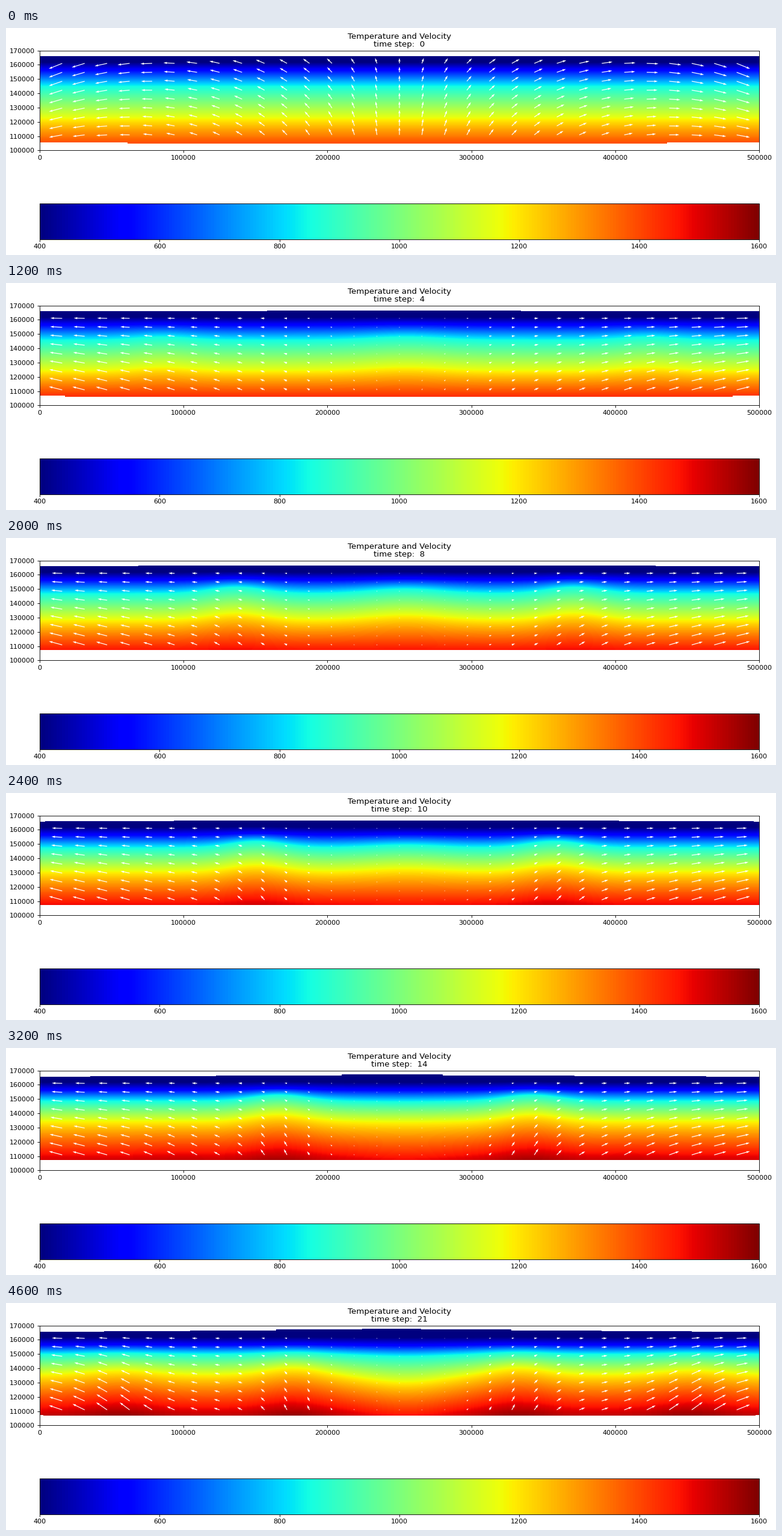
Write a matplotlib script that moves like this. It is 1280 px wide and 379 px high and loops after 4800 ms.

```python
import numpy as np
import matplotlib.pyplot as plt
from matplotlib.animation import FuncAnimation

W, H, DPI = 1280, 379, 80
LEFT, TOP, AX_W, AX_H = 56, 37.55, 1196, 166.9
FRAMES, INTERVAL, HOLD = 24, 200, 2

ROW = 1.44                      # height of one sampled row of the field
REST_TOP, REST_FLOOR = 47.6, 191.8
PEAK_X, PLUME_X = 640, 664


def ramp(step, start, end):
    return np.clip((step - start) / (end - start), 0, 1)


def smooth(t):
    return t * t * (3 - 2 * t)


def bell(x, mid, width):
    return np.exp(-((x - mid) / width) ** 2)


px = LEFT + np.arange(AX_W) + 0.5
py = (TOP + (np.arange(167) + 0.5) * AX_H / 167)[:, None]

# 0 at the sides of the layer, 1 under its highest point
toward_peak = np.where(px < PEAK_X, (px - LEFT) / (PEAK_X - LEFT),
                       (LEFT + AX_W - px) / (LEFT + AX_W - PEAK_X))


def plume_shapes(step, x):
    """Bells of the central, paired inner and paired outer plumes."""
    inner = 180 + 150 * np.exp(-(step - 6) / 5)
    outer = 430 + 15 * (step - 18)
    centre = bell(x, PLUME_X, 85)
    pair = bell(x, PLUME_X - inner, 65) + bell(x, PLUME_X + inner, 65)
    far = bell(x, PLUME_X - outer, 75) + bell(x, PLUME_X + outer, 75)
    return centre, pair, far


def lift(step, x):
    centre, pair, far = plume_shapes(step, x)
    growth = ramp(step, 2, 6)
    sinking = 11 - 1.53 * max(step - 6, 0)
    return growth * (sinking * centre + 11 * pair) + 7 * ramp(step, 14, 21) * far


def heating(step, x):
    _, pair, far = plume_shapes(step, x)
    return 50 * ramp(step, 6, 12) * pair + 50 * ramp(step, 12, 18) * far


def cooling(step, x):
    return 5 * max(step - 8, 0) * plume_shapes(step, x)[0]


def edges(step):
    """Top and bottom of the layer, snapped to sampled rows."""
    side, peak = 0.3 - 0.05 * step, 0.5 + 0.135 * step
    bend = np.clip((step - 5) / 9, 0.1, 1)
    surface = side + (peak - side) * toward_peak ** bend

    floor = (0.8 - 0.033 * min(step, 6) + 0.8 * toward_peak
             - 3.45 * ramp(step, 2, 6) + 0.12 * max(step - 14, 0))
    return REST_TOP - ROW * np.floor(surface), REST_FLOOR + ROW * np.floor(floor)


def temperature(step):
    warm = lift(step, px)
    cool = warm * (1 - 0.7 * smooth(ramp(step, 13, 18)))
    base = 1385 + 145 * ramp(step, 0, 16) ** 0.8

    # depths of fixed temperatures, from the surface down
    depth = [47 + 0 * px,
             70.5 - 0.25 * cool,
             98 - 12 * ramp(step, 0, 18) ** 1.2 - cool,
             150 - 31 * smooth(ramp(step, 0, 17)) - warm,
             191 - 3 * ramp(step, 2, 6) + 0 * px]
    level = [275, 550, 850, 1160,
             base + heating(step, px) - cooling(step, px)]

    field = np.full((len(py), AX_W), 275.0)
    for k in range(4):
        part = np.clip((py - depth[k]) / (depth[k + 1] - depth[k]), 0, 1)
        if k == 3:
            part = part ** 0.85
        field += part * (level[k + 1] - level[k])

    top, bottom = edges(step)
    return np.ma.masked_where((py < top) | (py > bottom), field)


gx, gz = np.meshgrid(15625 * np.arange(1, 32), 110900 + 6260 * np.arange(9))
side = (gx - 250000) / 234375
reach = np.abs(side)
low = (gz.max() - gz) / np.ptp(gz)
arrow_px = LEFT + gx / 500000 * AX_W


def blend(a, b, t):
    return a + (b - a) * t


def rising_flow():
    u = blend(19 * np.tanh(2.4 * side) + 3.5 * side ** 3,
              12 * np.tanh(2.5 * side) + 10 * side ** 3, low)
    v = blend(9 - 18 * side ** 2, 13 - 17 * reach ** 1.3, low)
    return u, v


def spreading_flow(step):
    age = ramp(step, 2, 6)
    u = side * reach ** (0.3 * age) * blend(22 - 5 * age, 22, low)
    v = 0.5 * reach + low * blend(4.5 * (1 - age), 4.5 + age, reach)
    v += 0.16 * heating(step, arrow_px) * blend(0.1, 1, low)
    return u, v


def velocity(step):
    mix = ramp(step, 0, 2)
    return [blend(a, b, mix) for a, b in zip(rising_flow(), spreading_flow(step))]


def pixel_axes(left, top, width, height):
    return fig.add_axes([left / W, (H - top - height) / H, width / W, height / H])


fig = plt.figure(figsize=(W / DPI, H / DPI), dpi=DPI, facecolor="white")
ax = pixel_axes(LEFT, TOP, AX_W, AX_H)
image = ax.imshow(temperature(0), cmap="jet", vmin=400, vmax=1600, aspect="auto",
                  extent=[0, 500000, 100000, 170000], interpolation="nearest")
arrows = ax.quiver(gx, gz, *velocity(0), color="white", angles="uv",
                   scale_units="dots", scale=1, width=0.001)
ax.set_xlim(0, 500000)
ax.set_ylim(100000, 170000)
title = ax.set_title("", fontsize=12, linespacing=0.96)
fig.colorbar(image, cax=pixel_axes(LEFT, 292.8, AX_W, 59.8),
             orientation="horizontal")


def draw(frame):
    step = max(0, frame - HOLD)
    image.set_data(temperature(step))
    arrows.set_UVC(*velocity(step))
    title.set_text(f"Temperature and Velocity\ntime step:  {step}")
    return image, arrows, title


anim = FuncAnimation(fig, draw, frames=FRAMES, interval=INTERVAL, repeat=True,
                     repeat_delay=0, blit=False)
plt.show()
```
